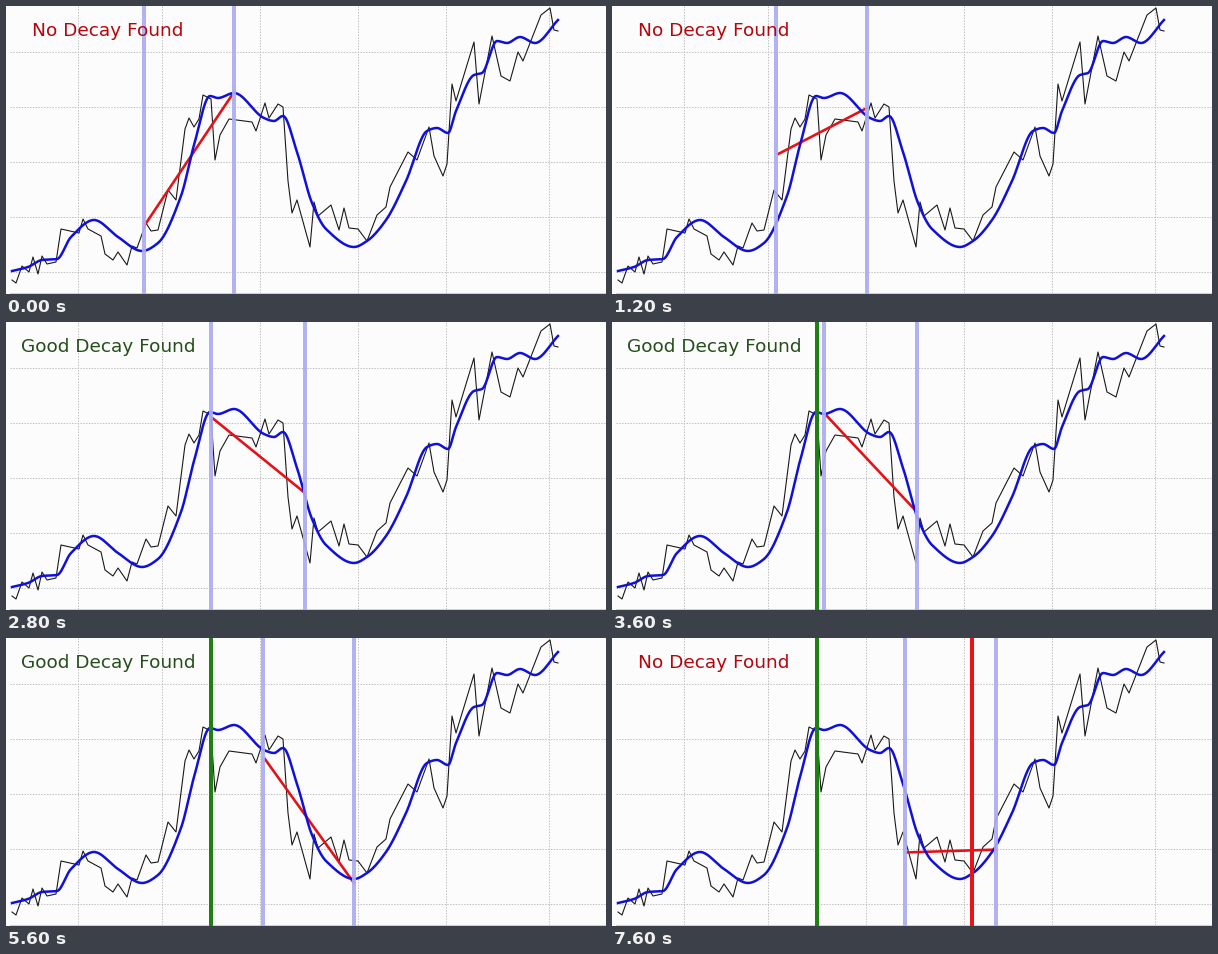
Write a matplotlib script that moves like this. It is 600x288 px and loops after 8000 ms.

```python
import numpy as np
import matplotlib.pyplot as plt
from matplotlib.animation import FuncAnimation

W, H, DPI = 600, 288, 100
PX = 72 / DPI
STEPS, STEP_MS = 20, 400
SAMPLES = 21  # prices inside one window

# Turning points of the price line
PRICE_X, PRICE_Y = np.transpose([
    (6, 274), (10, 277), (16, 260), (23, 266), (27, 251), (32, 268),
    (36, 250), (41, 258), (50, 256), (55, 223), (73, 227), (77, 213),
    (82, 223), (95, 230), (99, 248), (107, 254), (112, 246), (121, 259),
    (126, 240), (131, 242), (140, 217), (145, 225), (152, 224), (162, 184),
    (170, 194), (179, 123), (183, 112), (188, 121), (193, 113), (197, 89),
    (205, 93), (209, 154), (214, 129), (223, 113), (246, 116), (250, 125),
    (259, 97), (263, 112), (272, 98), (277, 101), (282, 175), (286, 207),
    (291, 194), (304, 241), (308, 196), (312, 210), (325, 199), (333, 224),
    (338, 202), (343, 222), (352, 223), (361, 235), (371, 209), (380, 201),
    (384, 181), (402, 146), (411, 154), (423, 121), (428, 150), (437, 170),
    (441, 158), (446, 78), (450, 95), (468, 36), (473, 98), (486, 30),
    (495, 70), (504, 75), (512, 46), (517, 55), (535, 9), (544, 2),
    (548, 24), (552, 25)])

# Knots of the smoothed line
KNOTS = [
    (6, 265), (22, 261), (36, 254), (51, 253), (65, 231), (88, 214),
    (112, 231), (136, 245), (152, 237), (175, 190), (188, 139), (204, 90),
    (212, 92), (228, 87), (258, 112), (268, 115), (277, 110), (291, 146),
    (306, 197), (320, 223), (348, 241), (361, 235), (380, 214), (400, 175),
    (421, 125), (431, 122), (442, 127), (450, 105), (468, 69), (476, 67),
    (491, 35), (501, 37), (514, 31), (529, 37), (552, 14)]

# The window slides evenly between these steps and rests at each signal
KEY_STEPS = [0, 3, 7, 8, 11, 14, 16, 17, 19]
KEY_LEFT = [137.5, 164, 205, 205, 225, 257, 271.5, 271.5, 293]
KEY_RIGHT = [228, 254.5, 299, 299, 316.5, 348, 360, 360, 383.5]
GOOD_START, GREEN_START, GOOD_END, RED_START = 7, 8, 16, 17


def smooth_curve(knots):
    """Monotone cubic through the knots, flat at every peak and dip."""
    x, y = np.transpose(knots).astype(float)
    slope = np.diff(y) / np.diff(x)
    before, after = slope[:-1], slope[1:]
    same_sign = before * after > 0
    total = np.where(same_sign, before + after, 1)
    inner = np.where(same_sign, 2 * before * after / total, 0)
    tangent = np.concatenate([slope[:1], inner, slope[-1:]])

    xs = np.arange(x[0], x[-1] + 1)
    i = np.clip(np.searchsorted(x, xs, side="right") - 1, 0, len(slope) - 1)
    width = x[i + 1] - x[i]
    t = (xs - x[i]) / width
    ease = t * t * (3 - 2 * t)
    ys = (y[i] * (1 - ease) + y[i + 1] * ease
          + width * t * (1 - t) * ((1 - t) * tangent[i] - t * tangent[i + 1]))
    return xs, ys


fig = plt.figure(figsize=(W / DPI, H / DPI), dpi=DPI, facecolor="#fcfcfc")
ax = fig.add_axes([0, 0, 1, 1])
ax.set_xlim(0, W)
ax.set_ylim(H, 0)
ax.axis("off")


def stroke(xs, ys, color, width, z, **style):
    return ax.plot(xs, ys, color=color, lw=width * PX, zorder=z, **style)[0]


def bar(x, color, z, **style):
    return stroke([x, x], [0, H], color, 4, z, solid_capstyle="butt", **style)


def grid_line(xs, ys):
    stroke(xs, ys, "#c0c0c0", 1, 1, ls=(0, (1.4, 1.4)))


for y in range(46, H, 55):
    grid_line([4, W], [y, y])
for x in (72, 156, 254, 352, 440, 543):
    grid_line([x, x], [0, H])
stroke([4, W], [H - 1, H - 1], "#d0d0d0", 1, 1)

stroke(PRICE_X, PRICE_Y, "#181818", 1.1, 2)
trend = stroke([], [], "#e41216", 2.6, 3)
stroke(*smooth_curve(KNOTS), "#1010dc", 2.5, 4)

edges = [bar(0, "#acacf2", 5, alpha=.92) for _ in range(2)]
green = bar(204.5, "#1e8012", 6)
red = bar(360, "#ea1418", 6)
label = ax.text(0, 30, "", fontsize=18.5 * PX, family="DejaVu Sans",
                va="baseline", zorder=7)


def update(step):
    left = np.interp(step, KEY_STEPS, KEY_LEFT)
    right = np.interp(step, KEY_STEPS, KEY_RIGHT)
    for edge, x in zip(edges, (left, right)):
        edge.set_xdata([x, x])

    # Least-squares line through the prices in the window
    xs = np.linspace(left, right, SAMPLES)
    fit = np.polyfit(xs, np.interp(xs, PRICE_X, PRICE_Y), 1)
    ends = np.array([left + 2, right])
    trend.set_data(ends, np.polyval(fit, ends))

    green.set_visible(step >= GREEN_START)
    red.set_visible(step >= RED_START)
    good = GOOD_START <= step < GOOD_END
    label.set_text("Good Decay Found" if good else "No Decay Found")
    label.set_x(15.3 if good else 26.3)
    label.set_color("#264e1c" if good else "#b4060c")
    return [trend, *edges, green, red, label]


anim = FuncAnimation(fig, update, frames=STEPS, interval=STEP_MS,
                     repeat=True, repeat_delay=0)
plt.show()
```
